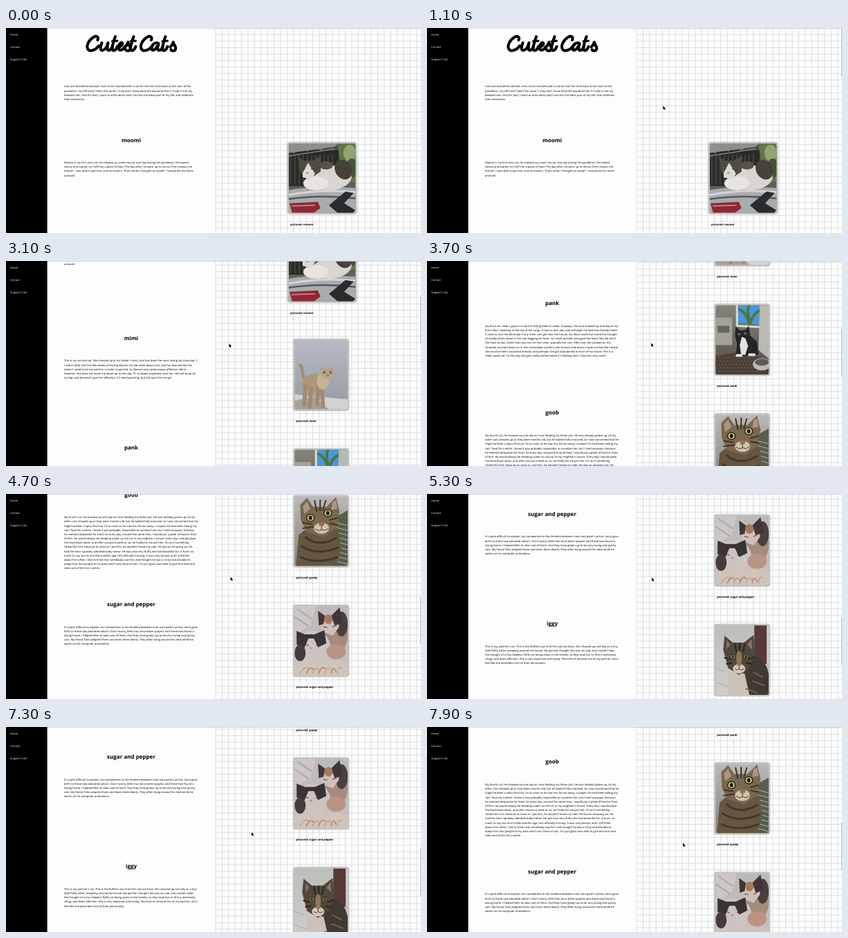
An HTML page with a canvas for the animation above (8000 ms loop, 600x298 px).

```html
<!DOCTYPE html>
<html lang="en">
<head>
<meta charset="utf-8">
<title>Cutest Cats</title>
<style>
html, body { margin: 0; width: 100%; height: 100%; overflow: hidden; background: #fdfdfd; }
canvas { display: block; width: 600px; height: 298px; }
</style>
</head>
<body>
<canvas id="stage" width="600" height="298"></canvas>
<script>
const ctx = document.getElementById('stage').getContext('2d');
const W = 600, H = 298, LOOP = 8000, MAX_SCROLL = 976;
const SECTION = 159.3, FIRST_HEADING = 162.7, LINE = 6.17;
const FONT = '"Open Sans", "Noto Sans", sans-serif';

// [time, value...] keys
const scrollKeys = [[0, 0], [1800, 0], [1900, 7], [2100, 31], [2500, 92], [3100, 210], [3700, 420],
  [4500, 596], [5300, 771], [5700, 893], [5800, 893], [6300, 976], [6400, 976], [7000, 840], [7900, 590]];
const cursorKeys = [[1000, 345, 112], [1700, 319.5, 121.5], [2100, 319.5, 121.5], [3100, 322.5, 120],
  [3700, 324, 119], [5300, 325, 121.5], [6300, 323, 120.5], [6900, 335, 132], [7600, 370, 168.5], [7900, 370, 168.5]];

const intro = `Cats are wonderful animals. Ever since I bonded with a cat for the first time back at the start of the
pandemic, my life hasn't been the same. I truly don't know what life would be like if I hadn't met my
beloved cats. And for that, I want to write about each cat that has been part of my life, and celebrate
their existences.`;

const cats = [
  { name: 'moomi', draw: drawMoomi, text: `Moomi is my first ever cat. He showed up under my car one day during the pandemic. He looked
skinny and scared, so I left him a plate of food. The day after, he went up to me as if he's known me
forever. I was able to pet him, and he loved it. That's when I thought to myself: "I would die for these
animals".` },
  { name: 'mimi', draw: drawMimi, text: `This is my second cat. She showed up at my father's farm, and has been the most loving cat since day 1.
I admit, after the first few weeks of having Moomi, he did settle down a bit, and has learned that he
doesn't need to let me pet him in order to get fed. So Moomi very rarely enjoys affection. Mimi
however, she does not leave me alone up to this day. If I sit down anywhere near her, she will jump on
my lap, and demand I give her affection. It's heartwarming, but she won't let me go!` },
  { name: 'pank', draw: drawPank, text: `My third cat. Yeah, I guess I'm kind of listing them in order. Anyways, this one showed up one day at my
front door meowing at the top of her lungs. It was a rainy day, and although my dad had already made
it clear to turn the blind eye if any other cats get near the house, my heart could not stand the thought
of a baby kitten alone in the rain begging for food. So I went outside, and gave her food. She ate all of
the food so fast, faster than any cat I've ever seen, specially her size. After that she jumped on my
shoulder and laid down on it. Her immediate comfort with human interaction made me feel like maybe
she must've been socialized already, and perhaps she got abandoned in front of my house. She is a
really sweet cat. To this day she gets really excited when it's feeding time. I love her very much.` },
  { name: 'goob', caption: 'gooby', draw: drawGoob, text: `My fourth cat. He showed up one day as I was feeding my three cats. He was already grown up, all my
other cats showed up as they were months old, but he looked fully matured, so I was concerned that he
might've been a spicy feral cat. So as soon as he saw me, he ran away. I suspect he had been eating my
cats' food for a while. I knew it was probably impossible to socialize him, but I tried anyways, because
he seemed desperate for food. So every day, around the same time, I would put a plate of food in front
of him. He would always be sleeping under an old car in my neighbor's house. Every day I would place
the food bowl closer, and after around a week or so, he finally let me pet him. It's as if something
clicked for him, because as soon as I pet him, he wouldn't leave my side. He was an amazing cat. He
had the most squeaky adorable baby meow. He was also very fluffy and had beautiful fur. It hurts so
much to say, but as of a few months ago, he's officially missing. It was very abrupt, and I still think
about him often. I like to think that somebody saw him and thought he was a stray and decided to
adopt him. But people in my area aren't very fond of cats. I'm just glad I was able to give him love and
take care of him for a while.` },
  { name: 'sugar and pepper', draw: drawSugar, text: `It's quite difficult to explain, but somewhere in the timeline between mimi and pank's arrival, mimi gave
birth to these two adorable calico's. Don't worry, Mimi has since been spayed, and these two found a
loving home. I helped Mimi to take care of them. And they have grown up to be very loving and quirky
cats. My friend Tolvi adopted them and loves them dearly. They often hang around his desk while he
works on his computer animations.` },
  { name: 'iggy', draw: drawIggy, text: `This is my partner's cat. This is the fluffiest out of all the cats we have. She showed up one day as a tiny
little fluffy kitten meowing around the house. My partner thought she was so cute, and couldn't help
the thought of a tiny helpless fluffy cat being alone in the streets, so they took her in. She is extremely
clingy, and loves affection. She is very explosive and loving. She kind of reminds me of my partner, and I
feel like she absorbed a bit of their personality.` },
  { name: 'mae', draw: drawMae, text: `This is my partner's first cat, before iggy showed up. She is the weirdest cat out of all the cats I know.
She highly values her privacy, and is not very affectionate. She's kind of the complete opposite to Iggy.
She also kind of looks like a wiggly plushie. However, she's not always a loner. Sometimes at night she
cuddles up with my partner, and sometimes she gets in a loving mood and rubs on you.` }
];

function sample(keys, t) {
  const i = keys.findIndex(k => k[0] >= t);
  if (i < 0) return keys[keys.length - 1].slice(1);
  if (i === 0) return keys[0].slice(1);
  const a = keys[i - 1], b = keys[i], p = (t - a[0]) / (b[0] - a[0]);
  return a.slice(1).map((v, n) => v + (b[n + 1] - v) * p);
}

function rect(color, x, y, w, h) {
  ctx.fillStyle = color;
  ctx.fillRect(x, y, w, h);
}
function oval(color, x, y, rx, ry, turn = 0) {
  ctx.fillStyle = color;
  ctx.beginPath();
  ctx.ellipse(x, y, rx, ry, turn, 0, Math.PI * 2);
  ctx.fill();
}
function shape(color, d) {
  ctx.fillStyle = color;
  ctx.fill(new Path2D(d));
}
function line(color, width, d) {
  ctx.strokeStyle = color;
  ctx.lineWidth = width;
  ctx.lineCap = ctx.lineJoin = 'round';
  ctx.stroke(new Path2D(d));
}
function shade(top, bottom, w, h) {
  const g = ctx.createLinearGradient(0, 0, 0, h);
  g.addColorStop(0, top);
  g.addColorStop(1, bottom);
  rect(g, 0, 0, w, h);
}
function text(str, x, y, size, { color = '#000', weight = 400, align = 'left' } = {}) {
  ctx.font = `${weight} ${size}px ${FONT}`;
  ctx.textAlign = align;
  ctx.fillStyle = color;
  ctx.fillText(str, x, y + size * 0.36);
}
function paragraph(str, y) {
  str.split('\n').forEach((row, i) => text(row, 84, y + i * LINE, 4.02));
}
function eyes(color, x1, y1, x2, y2, r) {
  for (const [x, y] of [[x1, y1], [x2, y2]]) {
    oval('#1d1b17', x, y, r * 1.25, r * 1.15);
    oval(color, x, y, r, r * 0.9);
    oval('#14130f', x, y, r * 0.45, r * 0.6);
  }
}

function drawMoomi(w, h) {
  shade('#484a45', '#6b7166', w, h);
  rect('#292b28', 0, 10, 72, 52);
  for (let x = 2; x < 68; x += 6) rect('#41433d', x, 16, 2, 44);
  shape('#8d908c', 'M0 0H72L66 5L0 14Z');
  line('#8b8e89', 1.2, 'M0 18L66 8M7 14L18 4L27 11L38 2L46 9L58 1');
  shape('#63764b', 'M70 0H98V56H80Z');
  oval('#93a573', 88, 14, 9, 12);
  oval('#425635', 91, 36, 8, 14);
  shape('#a9acae', 'M0 68Q40 60 98 65V102H0Z');
  line('#d3d5d6', 3, 'M0 75Q45 66 98 71');
  line('#55585b', 2.5, 'M0 81Q45 74 98 80');
  shape('#8e2835', 'M1 87L42 85L46 94L36 101H5Z');
  line('#d0797d', 2, 'M5 91L37 90');
  shape('#292b2d', 'M58 90L82 70L94 72L80 87L96 97L92 102H72Z');
  oval('#d9d6d2', 60, 50, 31, 18, -0.08);
  oval('#e8e5e1', 39, 58, 18, 10);
  oval('#48413b', 79, 38, 12, 15, -0.5);
  oval('#5b5149', 54, 32, 10, 6);
  shape('#514b42', 'M13 19L22 25H35L47 18L46 41L34 49L17 43Z');
  shape('#dedad4', 'M28 28L38 44L32 53L20 49L20 43Z');
  eyes('#8e955e', 21, 36, 35, 36, 2.2);
  oval('#b88780', 27, 43, 2, 1.4);
}

function drawMimi(w, h) {
  shade('#b5bac4', '#969ba2', w, h);
  shape('#d2d2d1', 'M0 79L77 86V101H0Z');
  shape('#a5a19a', 'M0 88L28 82L50 101H0Z');
  line('#a68b70', 4, 'M18 60C8 55 15 44 8 36');
  oval('#ad967b', 29, 62, 19, 13, -0.2);
  line('#a28b72', 6, 'M16 66L14 94M24 70L22 97M39 65L41 96M34 69L33 94');
  oval('#c5b398', 41, 60, 9, 12);
  shape('#b7a187', 'M36 37L42 42H51L57 37L57 50L48 57L39 52Z');
  eyes('#b9b987', 43, 47, 52, 47, 1.4);
  oval('#977263', 48, 51, 1.6, 1.1);
}

function drawPank(w, h) {
  shade('#85837b', '#514b44', w, h);
  shape('#4598db', 'M31 0H68V29L32 25Z');
  line('#4e7542', 4, 'M49 31Q47 12 34 6M50 27Q55 9 67 7M49 24Q45 8 48 1');
  line('#dddcd6', 3, 'M31 0V30L68 32');
  rect('#a5a096', 0, 18, 24, 40);
  rect('#67645c', 3, 30, 17, 10);
  shape('#bab8b2', 'M64 0H77V78L62 65Z');
  shape('#4c4036', 'M0 74L51 65L77 88V101H0Z');
  for (let y = 76; y < 101; y += 5)
    for (let x = (y % 2) * 2; x < 64; x += 5) oval('#756657', x, y, 1, 0.8);
  shape('#24242a', 'M29 31L36 37L43 36L48 30L50 44L60 53L62 72L29 74L31 56L28 44Z');
  shape('#e3e1dc', 'M38 46L43 48L47 59L43 72H37L35 58Z');
  line('#e6e4df', 4, 'M31 73H37M49 72H56');
  eyes('#bcb771', 34, 42, 43, 41, 1.6);
  oval('#b9bab9', 67, 86, 13, 9);
  oval('#5e5b58', 67, 83, 10, 5);
}

function drawGoob(w, h) {
  shade('#b8bab7', '#84827a', w, h);
  shape('#54604b', 'M59 30L77 20V101H58Z');
  for (let y = 38; y < 99; y += 7) line('#adac9e', 1.2, `M61 ${y}L76 ${y + 4}`);
  shape('#665640', 'M2 101L6 56L20 44L63 48L68 77L59 101Z');
  shape('#79674f', 'M8 12L18 2L27 15H46L60 1L65 22L60 46L42 59L17 51L9 34Z');
  shape('#ac9581', 'M55 8L60 5L62 18L53 19ZM12 14L18 7L23 18L14 25Z');
  line('#3b3328', 2, 'M29 6L32 21M37 5L37 20M45 6L41 20M12 38L25 40M12 46L27 44M62 31L51 34M61 41L51 39');
  line('#423829', 3, 'M16 59Q35 75 60 60M10 72Q32 87 63 74M9 88Q32 99 62 88');
  eyes('#b9b66d', 23, 31, 48, 24, 5);
  oval('#d0c4ad', 39, 46, 11, 8);
  oval('#9e6c58', 39, 40, 4, 3);
  line('#42372d', 1, 'M39 43V48Q34 51 30 47M39 48Q45 51 49 46');
}

function drawSugar(w, h) {
  shade('#bcb8b9', '#c9c1be', w, h);
  shape('#cdc6c4', 'M0 0H31L23 28L0 42Z');
  line('#a9a9ae', 2, 'M4 4L24 18M1 16L20 29');
  oval('#a58b7c', 59, 44, 18, 30, 0.2);
  oval('#4b3f3d', 68, 26, 9, 18);
  shape('#cdc0b7', 'M35 12L42 16H56L65 5L64 31L55 43L40 37Z');
  shape('#403638', 'M34 7L44 14L42 26L35 28ZM53 14L65 2L70 25L58 28Z');
  oval('#a9785a', 49, 19, 6, 7);
  oval('#cdc3bf', 26, 60, 26, 24, -0.2);
  shape('#393335', 'M3 36L15 41H29L43 35L46 54L34 60L28 47L20 47L14 61L3 56Z');
  oval('#453b3b', 8, 68, 8, 12);
  oval('#b99484', 60, 66, 14, 11);
  line('#413335', 1, 'M14 55L20 57M31 57L37 55M42 30L47 31M55 30L60 28');
  oval('#c78a86', 24, 61, 2, 1.4);
  shape('#cfc4ba', 'M0 82Q35 74 77 82V101H0Z');
  for (let i = 0; i < 7; i++) line(i % 2 ? '#b88078' : '#c0a27b', 1.5, `M${8 + i * 9} 98Q${15 + i * 8} 85 ${20 + i * 8} ${91 + i % 3 * 2}`);
}

function drawIggy(w, h) {
  shade('#bdbeba', '#cecdca', w, h);
  rect('#573a38', 56, 0, 21, 56);
  rect('#d0cfca', 74, 0, 3, 56);
  line('#aaaaa6', 1, 'M0 62L14 68M0 82L20 90');
  shape('#403a33', 'M42 37Q73 44 77 72V101H34Z');
  shape('#c9c2b5', 'M18 69L42 70L49 101H19Z');
  shape('#51483c', 'M11 35L13 15L25 25H41L55 14L57 40L49 62L34 72L18 62Z');
  shape('#8b7465', 'M16 21L21 28L16 35ZM52 20L46 28L53 35Z');
  line('#28241f', 2, 'M28 27L30 38M35 26L35 38M42 27L40 38M13 47L21 49M16 56L23 55M56 46L48 49M52 56L45 55');
  oval('#8d765c', 34, 48, 4, 11);
  eyes('#8f925f', 25, 45, 44, 45, 3);
  oval('#cfc6b9', 34, 63, 9, 7);
  oval('#a8705f', 34, 57, 3, 2);
  line('#514338', 1, 'M34 59V63Q31 66 28 63M34 63Q38 66 41 63');
  line('#6f6253', 2, 'M55 68L68 75M54 81L70 87M44 92L60 98');
}

function drawMae(w, h) {
  shade('#b3b5b1', '#686c6c', w, h);
  shape('#747b7e', 'M0 24L24 6L70 9L77 25V83H0Z');
  shape('#525b5e', 'M24 12L65 14L70 38L27 32Z');
  line('#9ba1a0', 2, 'M0 31L24 8L70 11');
  shape('#aeb0aa', 'M0 79L30 83L35 101H0Z');
  shape('#292b2b', 'M0 87L77 86V101H0Z');
  shape('#332d29', 'M23 29L30 35H38L44 30L46 46L55 58L57 86L47 96L26 92L20 78L24 59L20 47Z');
  oval('#765844', 34, 51, 6, 4);
  line('#665141', 4, 'M26 69L18 87M47 70L48 91');
  line('#aa3244', 3, 'M25 57Q37 62 46 55');
  shape('#d85469', 'M30 72L23 65Q24 60 29 63Q34 59 36 65Z');
  eyes('#bcb26e', 28, 43, 39, 43, 2);
}

function drawTitle() {
  const C = 'M132.5 17.5C134.5 12.5 130.5 11 127 13C120 17 116 25 118 30C120 35 129 33 134 26';
  const u = 'M138.5 21.5C136 28 136 33 139.5 32.5C143 32 146 27 147.5 21.5C146 28 146 33 149 32.5C151.5 32 153 29 154 26';
  const t = 'M158 12.5C155 21 152.5 30 154.5 32.3C157 34 160 30 161 27';
  const bar = 'M153.5 19.3L161 18.8';
  const e = 'M162 28C166 27.5 169 24 168 21.8C166 20 162.5 24 162.5 28.5C163 34 168.5 33 172 27';
  const s = 'M172 27.5C174.5 25.5 176 23 176.3 20.5C177 25 181 27 179.5 31C178 34 174 33.5 173 31.5';
  const a = 'M220.5 22.5C216.5 19.5 211 24 210.5 29C210.5 34.5 216 33 220.5 23.5C218.5 30 219 33 222 32.5C224.5 32 226 29 227 26';
  const word = [[C, 0], [u, 0], [t, 0], [bar, 0], [e, 0], [s, 0], [t, 26.5], [bar, 26.5],
    [C, 77.5], [a, 0], [t, 72.5], [bar, 72.5], [s, 65.5]];
  for (const [glyph, dx] of word) {
    ctx.save();
    ctx.translate(dx, 0);
    line('#000', glyph === bar ? 3 : 4.1, glyph);
    ctx.restore();
  }
}

function drawGrid(scroll) {
  const step = 9.375, color = '#dadada';
  for (let x = 303; x < W; x += step) rect(color, x - 0.4, 0, 0.9, H);
  for (let y = -(scroll % step); y < H; y += step) rect(color, 303, y, W - 303, 0.9);
}

function drawPhoto(cat, i) {
  const wide = i === 0;
  const x = wide ? 408.8 : 417.2, y = wide ? 167.8 : 324.9 + (i - 1) * SECTION;
  const w = wide ? 96.4 : 76.8, h = 100.8;
  ctx.save();
  ctx.shadowColor = 'rgba(0,0,0,.25)';
  ctx.shadowBlur = 2;
  ctx.fillStyle = '#c4c4c4';
  ctx.beginPath();
  ctx.roundRect(x - 2, y - 2, w + 4, h + 4, 4);
  ctx.fill();
  ctx.restore();
  ctx.save();
  ctx.beginPath();
  ctx.roundRect(x, y, w, h, 3);
  ctx.clip();
  ctx.translate(x, y);
  cat.draw(w + 1, h + 1);
  ctx.restore();
  text('pictured: ' + (cat.caption || cat.name), wide ? 411 : 419.2, 286 + i * SECTION - (wide ? 0 : 3), 4.02, { weight: 700 });
}

function drawCursor(x, y) {
  ctx.save();
  ctx.translate(x, y);
  const arrow = 'M0 0V5.2L1.2 4.2L2 6L2.9 5.6L2.1 3.9H3.8Z';
  line('#fff', 0.7, arrow);
  shape('#000', arrow);
  ctx.restore();
}

function draw(t) {
  const [scroll] = sample(scrollKeys, t);
  rect('#fdfdfd', 0, 0, W, H);
  ctx.textRendering = 'geometricPrecision';
  drawGrid(scroll);

  ctx.save();
  ctx.translate(0, -scroll);
  drawTitle();
  paragraph(intro, 85);
  cats.forEach((cat, i) => {
    const y = FIRST_HEADING + i * SECTION;
    if (y - scroll > H + 20 || y - scroll < -160) return;
    text(cat.name, 181, y, 8, { weight: 700, align: 'center' });
    paragraph(cat.text, y + 33);
    drawPhoto(cat, i);
  });
  ctx.restore();

  rect('#c4c4c4', 0, 0, W, 0.7);
  rect('#000', 0, 0, 59.6, H);
  ['Home', 'Contact', 'Support Cats'].forEach((label, i) => text(label, 6, 9.3 + i * 18, 4.02, { color: '#f0f0f0' }));

  if (t >= 1000) {
    const thumb = H * H / (H + MAX_SCROLL);
    rect('#bbb', 599, 1 + scroll / MAX_SCROLL * (H - thumb - 2), 1, thumb);
    drawCursor(...sample(cursorKeys, t));
  }
}

function frame(now) {
  draw(Math.floor((now % LOOP) / 100) * 100);
  requestAnimationFrame(frame);
}
requestAnimationFrame(frame);
</script>
</body>
</html>
```
